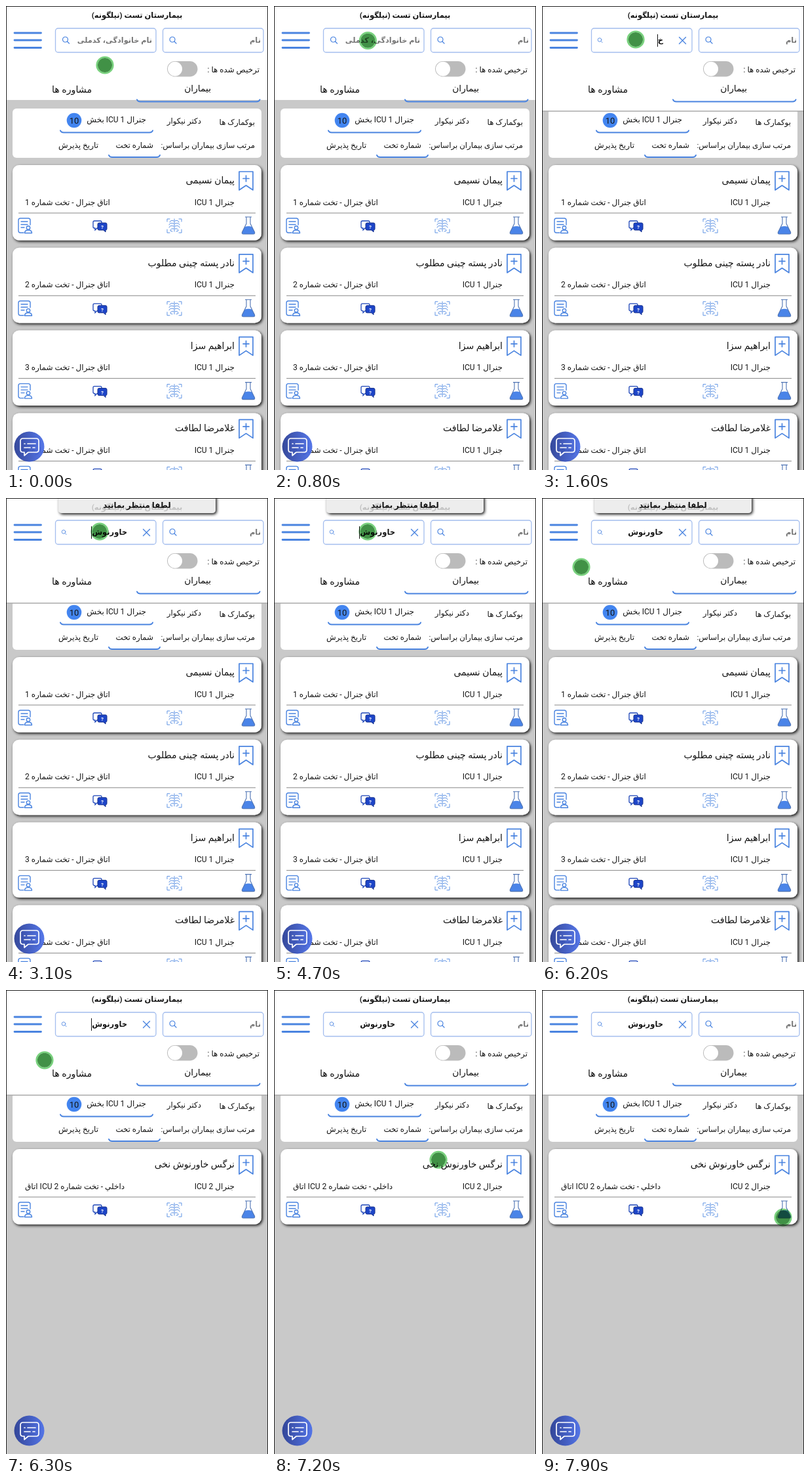
An HTML page for the animation above (8000 ms loop, 400 by 706 pixels).

```html
<!DOCTYPE html>
<html lang="fa">
<head>
<meta charset="utf-8">
<style>
  html, body { margin: 0; width: 100%; height: 100%; overflow: hidden; background: #c9c9c9; }
  svg { display: block; }
  text { font-family: Roboto, "DejaVu Sans", sans-serif; direction: rtl; fill: #151515; }
  .b { font-weight: bold; }
  .line { fill: none; stroke: #4a84e0; stroke-width: 1.4; stroke-linecap: round; stroke-linejoin: round; }
  .hint { fill: #777; }
  #dot { mix-blend-mode: multiply; }
</style>
</head>
<body>
<svg id="stage" width="400" height="706" viewBox="0 0 400 706">
  <defs>
    <linearGradient id="blue"><stop stop-color="#2b3f96"/><stop offset="1" stop-color="#4d70e8"/></linearGradient>
    <filter id="shade" x="-5%" y="-10%" width="112%" height="130%">
      <feDropShadow dx="1.800" dy="2" stdDeviation="2" flood-opacity=".9"/>
    </filter>
    <g id="lens" class="line" style="stroke-width:1.2"><circle r="4"/><path d="M3 3L6 6"/></g>
    <g id="mark" class="line"><path stroke-width="1.700" d="M356 10h21v28l-10.500-7-10.500 7z"/><path stroke-width="1.700" d="M366.500 16v9M362 20.500h9"/></g>
    <g id="note" class="line">
      <path d="M27 103h-5q-3 0-3-3v-16q0-3 3-3h12q3 0 3 3v7M23 86h10M23 90.500h10M23 95h5"/>
      <circle cx="34" cy="95.500" r="2.700"/><path d="M28.500 103.500q0-4.500 5.500-4.500t5.500 4.500z"/>
    </g>
    <g id="ask">
      <path d="M135 85h9q2 0 2 2v7q0 2-2 2h-5l-3 3v-3h-1q-2 0-2-2v-7q0-2 2-2z" fill="#fff" stroke="#1d45b8" stroke-width="1.300"/>
      <path d="M142 88h10q2 0 2 2v7q0 2-2 2v3l-3-3h-7q-2 0-2-2v-7q0-2 2-2z" fill="#1d45c8" stroke="#16308c"/>
      <text x="147" y="97" font-size="8" text-anchor="middle" style="fill:#fff" class="b">?</text>
    </g>
    <g id="xray" class="line" style="stroke-width:1;stroke:#5f93e4">
      <path d="M246 86v-4h4M264 82h4v4M246 98v5h4M264 103h4v-5"/>
      <path d="M257 82v19M256 85q-5-2-6 2M258 85q5-2 6 2M256 89q-6-2-7 2M258 89q6-2 7 2M256 93q-6-2-7 2M258 93q6-2 7 2M256 97q-5-1-5 3l3 1M258 97q5-1 5 3l-3 1"/>
    </g>
    <g id="flask">
      <path d="M364.500 94l-4 8q-1 3 2 3h15q3 0 2-3l-4-8q-5-2-11 0z" fill="#4a84e8"/>
      <path d="M365 79h10M367 79v10l-6.500 13q-1 3 2 3h15q3 0 2-3L373 89V79" fill="none" stroke="#4f74b4" stroke-width="1.100"/>
    </g>
  </defs>
  <rect width="400" height="706" fill="#c9c9c9"/>
  <g id="panel"></g>
  <g id="before"></g>
  <g id="after"></g>
  <rect id="header" width="400" height="143" fill="#fff"/>
  <path id="edge" d="M0 160H400" stroke="#aaa" stroke-width="1.500"/>
  <g id="top"></g>
  <g id="search">
    <use href="#lens" id="lens2"/>
    <g id="typed">
      <path class="line" d="M209.500 47.500l10 10m0-10l-10 10"/>
      <text id="query" class="b" x="185" y="56" font-size="11.500"></text>
      <path id="caret" d="M0 43V62" stroke="#111"/>
    </g>
  </g>
  <g id="toast">
    <rect x="80" y="-6" width="240" height="29" rx="5" fill="#ededed" filter="url(#shade)"/>
    <text class="b" x="200" y="18" font-size="11.500" text-anchor="middle" opacity=".2">بیمارستان تست (نیلگونه)</text>
    <text class="b" x="200" y="15" font-size="11.800" text-anchor="middle">لطفا منتظر بمانید</text>
  </g>
  <circle cx="35.500" cy="670.500" r="23" fill="url(#blue)" opacity=".95"/>
  <path d="M26 658h20q4 0 4 4v13q0 4-4 4H34l-6 5v-5h-2q-4 0-4-4v-13q0-4 4-4zM28 666h1M33 666h12M28 672h9M41 672h3"
    fill="none" stroke="#fff" stroke-width="1.700" stroke-linecap="round" stroke-linejoin="round"/>
  <path d="M.5 0V706M399.500 0V706M0 .5H400" stroke="#222" fill="none"/>
  <g id="dot">
    <circle r="12.300" fill="none" stroke="#78d27d" stroke-width="2.600"/>
    <circle r="11" fill="#419146"/>
  </g>
</svg>
<script>
const $ = id => document.getElementById(id);
const text = (x, y, size, str, attrs = '') => `<text x="${x}" y="${y}" font-size="${size}" ${attrs}>${str}</text>`;
const underline = (a, b, y) =>
  `<path class="line" style="stroke-width:2" d="M${a} ${y - 3}q1 3 5 3H${b - 5}q4 0 5-3"/>`;

function card(y, name, ward, bed, attrs = 'text-anchor="end"') {
  const icons = ['mark', 'note', 'ask', 'xray', 'flask'].map(id => `<use href="#${id}"/>`).join('');
  return `<g transform="translate(0 ${y})">
    <rect x="10" width="380" height="114.500" rx="10" fill="#fff" filter="url(#shade)"/>
    ${text(349, 28, 14, name)}${text(349, 60.5, 12, ward)}${text(29, 60.5, 12, bed, attrs)}
    <path d="M19 73H381" stroke="#888"/>${icons}</g>`;
}

$('panel').innerHTML = '<rect x="10" y="156" width="380" height="75" rx="6" fill="#fff"/>' +
  text(380, 181, 11.8, 'بوکمارک ها') + text(298, 179, 11.8, 'دکتر نیکوار') +
  text(214, 177, 12, 'جنرال ICU 1 بخش') +
  '<circle cx="104" cy="174" r="11.300" fill="#4385f0"/>' +
  text(104, 178.5, 13, '10', 'text-anchor="middle"') + underline(83, 224, 192.5) +
  text(380, 216, 11.8, 'مرتب سازی بیماران براساس:') + text(225, 216, 11.8, 'شماره تخت') +
  underline(157, 235, 230) + text(141, 216, 12, 'تاریخ پذیرش');

const patients = ['پیمان نسیمی', 'نادر پسته چینی مطلوب', 'ابراهیم سزا', 'غلامرضا لطافت'];
$('before').innerHTML = patients.map((name, i) =>
  card(242 + i * 125.8, name, 'جنرال ICU 1', `اتاق جنرال - تخت شماره ${i + 1}`)).join('');
$('after').innerHTML = card(242, 'نرگس خاورنوش نخی', 'جنرال ICU 2',
  'اتاق ICU داخلي - تخت شماره 2', 'style="direction:ltr"');

const field = x => `<rect x="${x}" y="34" width="153.500" height="36.500" rx="4" fill="#fff" stroke="#a3bdee" stroke-width="1.300"/>`;
$('top').innerHTML = text(200, 18, 11.5, 'بیمارستان تست (نیلگونه)', 'class="b" text-anchor="middle"') +
  '<path class="line" style="stroke-width:2.8" d="M13 41H53.500M13 52H53.500M13 63.500H53.500"/>' + field(75.5) + field(239.5) +
  '<use href="#lens" x="254" y="51"/>' + text(389, 56, 11.5, 'نام', 'class="b hint"') +
  text(223, 56, 11.3, 'نام خانوادگی، کدملی', 'class="b hint" id="hint"') +
  text(387, 101, 11.9, 'ترخیص شده ها :') +
  '<rect x="246" y="84" width="46.500" height="23.500" rx="11.700" fill="#bbb"/><circle cx="258" cy="95.700" r="11" fill="#fff"/>' +
  text(313, 130, 13.8, 'بیماران') + text(131, 132, 14.2, 'مشاوره ها') + underline(200, 387.5, 145.5);

const QUERY = 'خاورنوش';
// time, x, y of the pointer
const path = [[100, 151, 90], [900, 143, 51], [5300, 143, 51], [6200, 60, 105], [6500, 56, 112], [7700, 368, 346]];

function pointer(t) {
  let i = path.findIndex(p => p[0] > t);
  if (i < 0) return path[path.length - 1].slice(1);
  if (i === 0) return path[0].slice(1);
  const [a, b] = [path[i - 1], path[i]];
  const u = (t - a[0]) / (b[0] - a[0]), k = u * u * (3 - 2 * u);
  return [1, 2].map(j => a[j] + (b[j] - a[j]) * k);
}

const show = (id, on) => $(id).style.display = on ? '' : 'none';

function draw(now) {
  const t = now % 8000;
  const focused = t >= 1200, found = t >= 6300;
  const count = t < 1500 ? 0 : Math.min(QUERY.length, 1 + Math.floor((t - 1500) / 145));
  $('header').setAttribute('height', focused ? 160 : 143);
  show('edge', focused);
  show('before', !found);
  show('after', found);
  show('hint', !count);
  show('typed', count);
  $('lens2').setAttribute('transform', count ? 'translate(88 51.500) scale(.7)' : 'translate(90.500 51)');
  if ($('query').textContent !== QUERY.slice(0, count)) $('query').textContent = QUERY.slice(0, count);
  if (count) $('caret').setAttribute('transform', `translate(${Math.round(184 - $('query').getComputedTextLength()) + .5} 0)`);
  show('caret', t < 3300 || (t + 700) % 1000 < 500);
  show('toast', t >= 2700 && !found);
  $('toast').setAttribute('transform', `translate(0 ${-30 * Math.max(0, 1 - (t - 2700) / 300) ** 2})`);
  $('dot').setAttribute('transform', `translate(${pointer(t)})`);
  requestAnimationFrame(draw);
}
requestAnimationFrame(draw);
</script>
</body>
</html>
```
